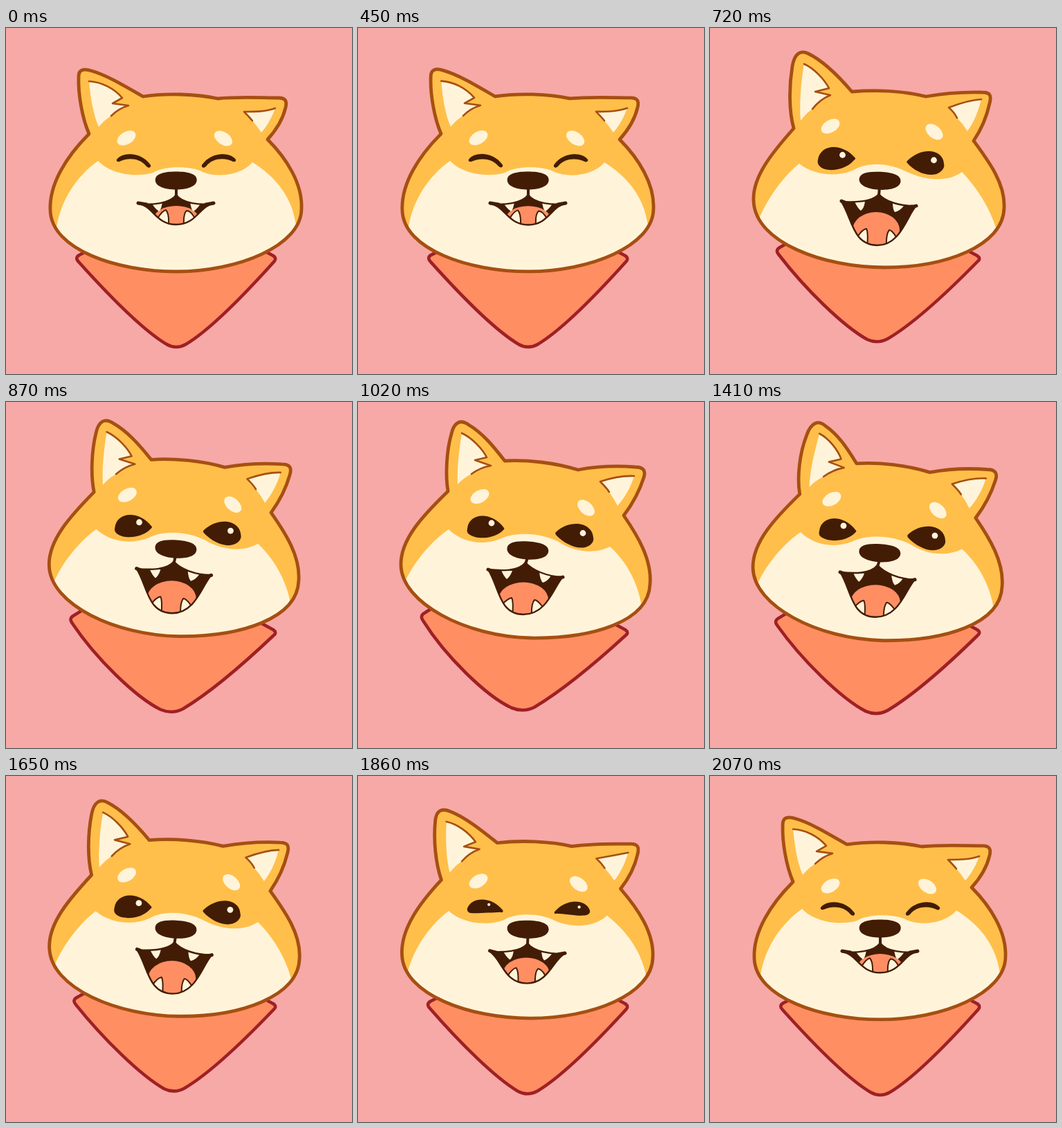
Animation, 500 px wide and 500 px high, one loop 2100 ms. Source, as an HTML page:

```html
<!DOCTYPE html>
<html lang="en">
<head>
<meta charset="utf-8">
<title>Happy dog</title>
<style>
  html, body { margin: 0; width: 100%; height: 100%; overflow: hidden; background: #f6a9a6; }
  svg { display: block; width: 100%; height: 100%; stroke-linejoin: round; stroke-linecap: round; }
  .cream { fill: #fff4da; }
  .dark { fill: #431c05; }
  .line { fill: none; stroke: #a64f12; stroke-width: 2.6; }
  .lip { fill: none; stroke: #431c05; }
</style>
</head>
<body>
<svg viewBox="0 0 500 500">
  <defs>
    <clipPath id="headClip"><path data-pose="head"/></clipPath>
    <clipPath id="mouthClip"><path data-pose="mouth"/></clipPath>
  </defs>
  <path data-pose="scarf" fill="#ff8e63" stroke="#9f2026" stroke-width="4.6"/>
  <g id="dog">
    <path data-pose="head" fill="#ffbf4a"/>
    <g clip-path="url(#headClip)"><path data-pose="muzzle" class="cream"/></g>
    <path data-pose="earL" class="cream"/>
    <path data-pose="earL" data-open class="line"/>
    <path data-pose="earR" class="cream"/>
    <path data-pose="earR" data-open class="line"/>
    <path data-pose="head" class="line" style="stroke-width:4.8"/>
    <ellipse data-pose="browL" rx="14.5" ry="9" class="cream"/>
    <ellipse data-pose="browR" rx="14.5" ry="9" class="cream"/>
    <path data-pose="eyeL" class="dark"/>
    <path data-pose="eyeR" class="dark"/>
    <circle data-pose="glintL" r="4.4" class="cream"/>
    <circle data-pose="glintR" r="4.4" class="cream"/>
    <path data-pose="mouth" class="dark"/>
    <g clip-path="url(#mouthClip)">
      <circle data-pose="tongue" r="1" fill="#ff8e63"/>
      <path data-pose="fangL" class="cream"/>
      <path data-pose="fangR" class="cream"/>
      <path data-pose="toothL" class="cream" stroke="#431c05" stroke-width="2"/>
      <path data-pose="toothR" class="cream" stroke="#431c05" stroke-width="2"/>
    </g>
    <path data-pose="mouth" class="lip" stroke-width="2.4"/>
    <path data-pose="corners" class="lip" stroke-width="5"/>
    <path data-pose="philtrum" class="lip" stroke-width="4"/>
    <path data-pose="nose" class="dark" d="M-30 -1C-30 -10 -17 -13 0 -13C17 -13 30 -10 30 -1C30 9 15 13 0 13C-15 13 -30 9 -30 -1Z"/>
  </g>
</svg>
<script>
// Each part: resting, halfway and raised pose, blended number by number.
const poses = {
  head: [
    'M120 153 C110 130 104 95 105 70 C105 60 112 58 124 62 C145 68 170 83 198 99 C230 94 275 95 306 102 C335 99 370 101 394 101 C405 101 406 107 404 115 C400 132 390 148 378 161 C405 188 429 225 427 262 C426 315 335 352 246 352 C160 352 66 320 64 264 C62 225 88 185 120 153 Z',
    'M121 145 C114 120 114 85 119 55 C122 38 130 31 142 37 C165 48 187 71 205 92 C240 89 280 91 312 99 C340 94 365 92 394 93 C405 93 407 98 404 109 C400 128 393 145 381 163 C403 193 427 225 425 260 C424 315 340 346 252 346 C165 346 65 310 63 250 C61 215 90 180 121 145 Z',
    'M130 129 C126 105 128 70 135 46 C139 28 149 25 160 33 C180 45 195 63 212 85 C245 83 285 88 318 98 C345 93 375 92 401 94 C413 94 416 100 413 109 C407 128 397 147 384 164 C404 193 425 228 422 263 C420 318 338 342 250 341 C155 339 63 290 62 236 C61 198 95 163 130 129 Z'],
  muzzle: [
    'M73 288 C80 245 105 212 133 192 C150 210 185 217 213 209 C228 199 268 199 284 208 C305 217 340 213 356 194 C390 215 414 245 419 285 L400 400 L80 400 Z',
    'M70 278 C82 248 105 215 129 196 C150 213 185 216 208 205 C230 192 262 196 285 208 C315 222 345 222 364 208 C385 230 405 260 414 292 L395 400 L80 400 Z',
    'M67 262 C80 232 105 202 131 184 C150 203 180 208 205 198 C230 186 265 190 288 201 C315 219 345 219 364 209 C388 230 405 262 410 296 L395 400 L80 400 Z'],
  earL: [
    'M120 77 C138 78 156 87 168 101 L154 109 L177 112 C167 115 159 120 152 127 Q142 133 134 143 C126 125 122 100 120 77 Z',
    'M136 52 C150 58 165 74 172 87 L152 92 L174 97 C164 101 155 108 148 117 Q138 124 131 134 C129 110 131 80 136 52 Z',
    'M150 45 C165 52 180 68 186 80 L169 84 L192 92 C181 94 172 98 164 104 Q152 110 144 119 C143 95 146 70 150 45 Z'],
  earR: [
    'M389 116 C375 121 360 121 344 121 C348 125 352 129 356 134 Q363 142 369 151 C377 142 384 130 389 116 Z',
    'M392 103 C375 104 358 110 345 115 C350 119 354 124 357 130 Q366 139 372 149 C381 137 388 120 392 103 Z',
    'M399 107 C382 106 365 110 350 115 C355 120 360 125 363 130 Q370 140 375 150 C385 139 394 124 399 107 Z'],
  scarf: [
    'M130 316 L106 328 Q99 332 105 338 C150 388 200 438 232 457 Q246 465 260 457 C292 438 342 388 387 338 Q392 333 386 329 L362 316 Z',
    'M120 306 L101 317 Q94 321 99 327 C138 378 193 431 227 450 Q242 457 257 449 C291 429 341 384 387 337 Q392 333 386 329 L362 316 Z',
    'M110 296 L96 305 Q89 309 94 316 C126 367 185 425 222 442 Q239 449 255 441 C290 420 340 380 387 337 Q392 333 386 329 L362 316 Z'],
  browL: ['translate(174 159) rotate(-30)', 'translate(174 142) rotate(-30)', 'translate(176 136.5) rotate(-28)'],
  browR: ['translate(314 159.5) rotate(34)', 'translate(324 150) rotate(40)', 'translate(329.5 153) rotate(42)'],
  eyeL: [
    'M160 190 C168 179 195 178 209 198 C210 202 206 203 203 200 C192 186 174 188 164 193 C161 194 159 192 160 190 Z',
    'M156 190 C160 168 190 165 210 188 C210 189 210 190 208 191 C195 207 168 208 160 201 C156 198 155 194 156 190 Z',
    'M158 183 C160 160 193 157 211 182 C212 183 211 184 210 185 C198 198 172 199 162 192 C158 190 157 187 158 183 Z'],
  eyeR: [
    'M332 190 C324 179 297 178 283 198 C282 202 286 203 289 200 C300 186 318 188 328 193 C331 194 333 192 332 190 Z',
    'M338 196 C337 176 308 170 285 192 C284 193 284 194 285 195 C298 210 322 218 334 207 C338 203 339 200 338 196 Z',
    'M340 196 C339 175 308 168 286 188 C285 189 285 190 286 192 C300 207 322 216 335 207 C339 204 341 200 340 196 Z'],
  glintL: ['translate(187 186) scale(0)', 'translate(191.5 183.5) scale(1)', 'translate(193 175) scale(1)'],
  glintR: ['translate(316 186) scale(0)', 'translate(323.5 191) scale(1)', 'translate(325 189.5) scale(1)'],
  nose: ['translate(245.7 220.5) rotate(0)', 'translate(245.5 220.8) rotate(3)', 'translate(245.3 214.5) rotate(4)'],
  philtrum: ['M246 230 L246 243', 'M245 230 L244 242', 'M245 225 L242 234'],
  mouth: [
    'M191 254 C210 256 238 254 246 241 C254 254 282 256 300 254 C280 256 276 284 246 284 C216 284 212 256 191 254 Z',
    'M190 251 C208 252 234 252 244 240 C253 251 276 258 298 257 C285 270 276 314 242 314 C206 314 206 276 190 251 Z',
    'M188 242 C208 244 232 245 242 232 C252 243 272 252 296 253 C283 266 274 307 239 307 C203 307 204 266 188 242 Z'],
  corners: [
    'M191 253 Q197 254 203 255 M289 255 Q295 254 300 253',
    'M190 250 Q193 251 197 253 M291 258 Q295 258 298 257',
    'M188 242 Q191 243 195 245 M289 254 Q293 254 296 253'],
  tongue: ['translate(246 277) scale(33 20)', 'translate(240 292) scale(34 26)', 'translate(239 285.5) scale(36 25)'],
  fangL: [
    'M210 252 L226 250 Q225 262 221 265 Q214 260 210 252 Z',
    'M209 251 L224 250 Q223 260 218 264 Q213 260 209 251 Z',
    'M207 243 L223 244 Q220 252 215 256 Q210 251 207 243 Z'],
  fangR: [
    'M282 252 L266 250 Q267 262 271 265 Q278 260 282 252 Z',
    'M280 257 L264 252 Q264 262 267 266 Q275 264 280 257 Z',
    'M279 251 L262 245 Q263 257 267 261 Q274 259 279 251 Z'],
  toothL: [
    'M219 275 Q226 264 231 263 Q236 268 235 286 L218 286 Z',
    'M213 302 Q220 291 226 290 Q229 296 227 318 L212 318 Z',
    'M208 293 Q216 284 222 283 Q225 288 223 311 L207 311 Z'],
  toothR: [
    'M273 275 Q267 264 261 264 Q256 268 257 286 L274 286 Z',
    'M269 302 Q263 292 259 292 Q254 298 255 318 L270 318 Z',
    'M266 295 Q259 286 255 286 Q250 292 251 311 L267 311 Z']
};

const LOOP = 2100, STEP = 30;
const tracks = {
  lift: [[420, 0], [1020, 1], [1350, 1], [2100, 0]],
  pull: [[420, 0], [1020, 1], [2080, 0]],
  bob: [[720, 0], [915, -4.5], [1020, 0], [1440, 3.6], [2100, 0]],
  perk: [[1020, 0], [1380, 8], [1650, 0]]
};
// Height at which each left ear shape starts to lean.
const earBase = { head: 85, earL: 110 };

const numbers = text => text.match(/-?[\d.]+/g).map(Number);
const values = Object.fromEntries(
  Object.entries(poses).map(([name, list]) => [name, list.map(numbers)]));
const parts = [...document.querySelectorAll('[data-pose]')];
const dog = document.getElementById('dog');

function track(keys, time) {
  if (time <= keys[0][0]) return keys[0][1];
  for (let i = 1; i < keys.length; i++) {
    const [t0, a] = keys[i - 1], [t1, b] = keys[i];
    if (time > t1) continue;
    const u = (time - t0) / (t1 - t0);
    return a + (b - a) * u * u * (3 - 2 * u);
  }
  return keys.at(-1)[1];
}

function blend(name, amount) {
  const half = amount < 0.5 ? 0 : 1, u = amount * 2 - half;
  const from = values[name][half], to = values[name][half + 1];
  let i = 0;
  return poses[name][0].replace(/-?[\d.]+/g, () => {
    const value = from[i] + (to[i] - from[i]) * u;
    i++;
    return value.toFixed(3);
  });
}

// Leans only the points above the base, the higher the more.
function leanEar(d, base, perk) {
  return d.replace(/([\d.]+) ([\d.]+)/g, (_, x, y) => {
    const shift = perk * Math.max(0, base - y) / 57;
    return `${+x + shift} ${y - shift * 0.35}`;
  });
}

function draw(time) {
  const lift = track(tracks.lift, time), pull = track(tracks.pull, time);
  const perk = track(tracks.perk, time);
  for (const part of parts) {
    const name = part.dataset.pose;
    let shape = blend(name, name === 'scarf' ? pull : lift);
    if (name in earBase) shape = leanEar(shape, earBase[name], perk);
    if ('open' in part.dataset) shape = shape.split('Q')[0];
    part.setAttribute(shape[0] === 'M' ? 'd' : 'transform', shape);
  }
  dog.setAttribute('transform', `translate(0 ${track(tracks.bob, time)})`);
}

const start = performance.now();
function tick() {
  const time = (performance.now() - start) % LOOP;
  draw(Math.floor(time / STEP) * STEP);
  requestAnimationFrame(tick);
}
tick();
</script>
</body>
</html>
```
